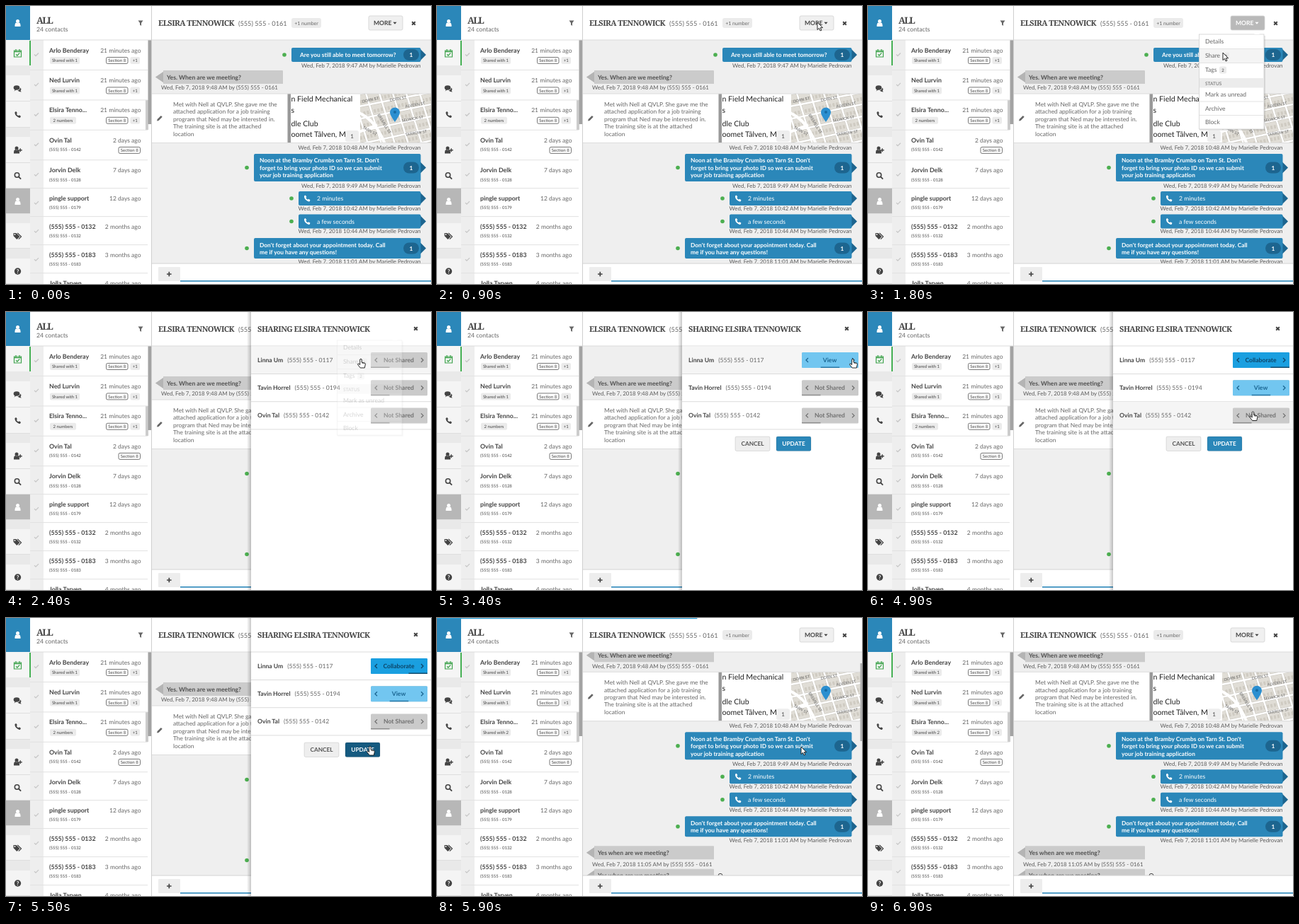
Write an HTML page that moves like this. It is 600x393 px and loops after 7 s.

```html
<!DOCTYPE html>
<html lang="en">
<head>
<meta charset="utf-8">
<title>Sharing a contact</title>
<style>
html, body { margin: 0; width: 100%; height: 100%; overflow: hidden; background: #fff; }
svg { display: block; width: 600px; height: 393px; font-family: Lato, sans-serif; text-rendering: geometricPrecision; }
.slab { font-family: "Noto Serif", serif; font-weight: 700; }
</style>
</head>
<body>
<svg id="stage" viewBox="0 0 600 393"></svg>
<script>
const BLUE = '#2b87b9', DARK = '#1d658f', INK = '#444', SOFT = '#666', LINE = '#dcdcdc';
const NAME = 'Elsira Tennowick', PHONE = '(555) 555 - 0161', AGENT = 'Marielle Pedrovan';
const LOOP = 7000, SCROLL = 47.7;

// Markup helpers
const BOLD = 'font-weight="700"', END = 'text-anchor="end"', MID = 'text-anchor="middle"', BOLD_MID = `${BOLD} ${MID}`;
const rect = (x, y, w, h, fill, more = '') => `<rect x="${x}" y="${y}" width="${w}" height="${h}" fill="${fill}" ${more}/>`;
const text = (x, y, s, size = 8.5, fill = INK, more = '') => `<text x="${x}" y="${y}" font-size="${size}" fill="${fill}" ${more}>${s}</text>`;
const path = (d, stroke, w = 1, more = '') => `<path d="${d}" fill="none" stroke="${stroke}" stroke-width="${w}" ${more}/>`;
const shape = (d, fill) => `<path d="${d}" fill="${fill}"/>`;
const at = (x, y, body) => `<g transform="translate(${x} ${y})">${body}</g>`;
const group = (id, body) => `<g id="${id}">${body}</g>`;
const hline = (x, y, w, fill = LINE) => rect(x, y, w, 1, fill);
const slab = (x, y, s, size = 11, gap = -.55) => text(x, y, s, size, INK, `class="slab" letter-spacing="${gap}"`);

// Icons, centred on 0,0
const person = c => `<circle cy="-2.6" r="2.5" fill="${c}"/>` + shape('M-4 5V3Q-4 0-1.8-.4Q0 1 1.8-.4Q4 0 4 3V5Z', c);
const phone = c => shape('M-4-3.5L-2.2-4.6L-.6-2L-1.7-.9Q-.8 1 1 1.8L2.1.7L4.5 2.3L3.5 4.2Q1.5 5-1.2 2.6Q-4.4-.2-4-3.5Z', c);
const cross = path('M-2.3-2.3L2.3 2.3M2.3-2.3L-2.3 2.3', INK, 2);
const pencil = shape('M-4 4L-3.3 1.5L1.8-3.6L3.7-1.7L-1.4 3.4Z', SOFT);
const check = path('M-3 0L-1 2L3-2', '#c6c6c6', 1.3);
const funnel = shape('M-3.5-3.5H3.5L1 0V4L-1 2.5V0Z', SOFT);
const caret = shape('M-2.6-1.2H2.6L0 1.8Z', 'currentColor');
const calendar = path('M-5-4H5V5H-5ZM-5-2.4H5M-2.5-6V-3M2.5-6V-3', '#3fa34d', 1.2) + path('M-2.4 1.2L-.6 3L2.8-.6', '#3fa34d', 1.3);
const chat = `<ellipse cx="-1.5" cy="-1" rx="4.3" ry="3.2" fill="${INK}"/>` + shape('M-5 4L-3.5 1H-1ZM3.5-1Q6 1 4 3.2L5.2 5Q2 4.8 0 3Q3 2.6 3.5-1Z', INK);
const addUser = at(-1.5, 0, person(INK)) + path('M3.7-2.2V2.8M1.2.3H6.2', INK, 1.4);
const search = `<circle cx="-1" cy="-1" r="3.2" fill="none" stroke="${INK}" stroke-width="1.6"/>` + path('M1.4 1.4L4.6 4.6', INK, 1.9);
const tags = shape('M-6-4H-2L3 1L-1.2 5L-6 0Z', INK) + path('M-.3-4L5 1L1.3 4.7', INK, 1.2) + '<circle cx="-4" cy="-2" r=".9" fill="#fff"/>';
const help = `<circle r="4.7" fill="${INK}"/>` + text(0, 2.8, '?', 8, '#fff', BOLD_MID);

function sidebar() {
  const items = [[98, 37, chat], [135, 37, phone(INK)], [185, 37, addUser], [222, 36, search],
    [258, 36, person('#fff'), '#b7b7b7'], [307, 36, tags], [357, 36, help]];
  return rect(0, 0, 34, 393, '#e9e9e9') + rect(0, 0, 34, 48, BLUE) + at(16.5, 24, person('#fff')) +
    rect(0, 48, 34, 36, '#f5f5f5') + rect(33, 49, 2, 35, '#45b054') + at(16.5, 67, calendar) +
    items.map(([y, h, icon, fill = '#f4f4f4']) =>
      rect(0, y, 34, h, fill) + hline(0, y + h - 1, 34, '#dedede') + at(16.5, y + h / 2, icon)).join('');
}

const pill = (x, y, w, s) => rect(x, y - 5, w, 10, '#ebebeb', 'rx="2"') +
  text(x + w / 2, y + 2.2, s, 6, INK, MID);
const section = (x, y) => rect(x, y - 4.5, 30.5, 9, '#fff', 'rx="2" stroke="#555" stroke-width=".8"') +
  text(x + 15.2, y + 2.2, 'Section 8', 6.1, INK, MID);

function contacts() {
  const rows = [
    ['Arlo Benderay', '21 minutes ago', 'Shared with 1'],
    ['Ned Lurvin', '21 minutes ago', 'Shared with 1'],
    ['Elsira Tenno...', '21 minutes ago', ''],
    ['Ovin Tal', '2 days ago', '(555) 555 - 0142'],
    ['Jorvin Delk', '7 days ago', '(555) 555 - 0128'],
    ['pingle support', '12 days ago', '(555) 555 - 0179'],
    ['(555) 555 - 0132', '2 months ago', '(555) 555 - 0132'],
    ['(555) 555 - 0183', '3 months ago', '(555) 555 - 0183'],
    ['Jolla Tarven', '4 months ago', '']];
  let out = rect(34, 0, 172, 393, '#fff') + rect(34, 48, 19, 345, '#eee') + rect(197, 133, 4, 42, '#ccc');
  rows.forEach(([name, when, sub], i) => {
    const y = i < 5 ? 48 + i * 42.4 : 217.6 + (i - 4) * 40;
    const mid = y + (i < 5 ? 14.5 : 14);
    out += text(61, mid + 3, name, 8.8, INK, BOLD) + text(190.5, mid + 3, when, 8.5, SOFT, END) + at(43, y + 20.5, check);
    if (i < 3) {
      const t = y + 29;
      out += section(141.5, t) + pill(175.5, t, 13.5, '+1');
      out += i < 2 ? pill(62, t, 42, sub) :
        group('before', pill(62, t, 37, '2 numbers')) + group('after', pill(62, t, 42, 'Shared with 2'));
    } else out += text(61, mid + 15.5, sub, 6, INK);
    if (i === 3) out += section(159, y + 28.7);
    out += hline(34, y + (i < 4 ? 42 : 39.5), 166, '#e2e2e2');
  });
  return out + rect(200.5, 48, 4.5, 119, '#a3a3a3') +
    rect(34, 0, 172, 48, '#fff') + slab(43, 25, 'ALL', 13, -1.5) + text(43, 36, '24 contacts', 8.7, SOFT) +
    at(190, 24, funnel) + hline(34, 47.5, 172) + rect(205, 0, 1, 393, '#cfcfcf');
}

const stamp = (y, time, x) => x ? text(x, y, `Wed, Feb 7, 2018 ${time} AM by ${PHONE}`, 7.9, '#5a5a5a')
  : text(585.5, y, `Wed, Feb 7, 2018 ${time} AM by ${AGENT}`, 7.9, '#5a5a5a', END);

function sent(x, y, h, lines, call) {
  const m = y + h / 2;
  let out = shape(`M585 ${m - 8}L593 ${m}L585 ${m + 8}Z`, DARK) + rect(x, y, 585.5 - x, h, BLUE, 'rx="2"') +
    `<circle cx="${x - 10}" cy="${m}" r="2.8" fill="#4caf50"/>`;
  if (call) return out + at(425, m, phone('#fff')) + text(439, m + 3, lines[0], 8.6, '#fff');
  const tx = x > 400 ? 415 : 358;
  lines.forEach((s, i) => out += text(tx, m + 3.3 + (i - (lines.length - 1) / 2) * 10.5, s, 8.35, '#fff', BOLD));
  return out + rect(561, m - 8, 22, 16, DARK, 'rx="8"') + text(572, m + 3, '1', 8.3, '#fff', BOLD_MID);
}

const received = (y, s) => shape(`M222 ${y}H390Q391 ${y} 391 ${y + 1}V${y + 19}H222V${y + 17}L211 ${y + 9.5}L222 ${y + 2}Z`, '#cbcbcb') +
  shape(`M222 ${y + 2}L211 ${y + 9.5}L222 ${y + 17}Z`, '#b4b4b4') + text(227, y + 12.6, s, 8.6, '#505050', BOLD);

function map() {
  const label = (x, y, turn, s) => `<text transform="translate(${x} ${y}) rotate(${turn})" font-size="5.5" fill="#666">${s}</text>`;
  let roads = '', lots = '';
  for (let i = 0; i < 7; i++) {
    roads += `M${-20 + i * 4} ${-14 + i * 17}L110 ${-38 + i * 17}M${-12 + i * 19} -4L${12 + i * 19} 74`;
    lots += `M-10 ${-3 + i * 17}L110 ${-29 + i * 17}`;
  }
  return `<svg x="500" y="124" width="100" height="69">` + rect(0, 0, 100, 69, '#e0ddd6') +
    path(lots, '#cfcbc2', 5, 'stroke-dasharray="3 2"') + path(roads, '#c4c1b9', 3.6) + path(roads, '#fff', 2.6) +
    path('M-4 26Q22 36 36 74M-4 55L24 44', '#fff', 4) +
    label(3, 13, -12, 'DORN ST') + label(42, 11, -10, 'DORN ST') + label(64, 20, -10, 'ALVERN ST') +
    label(59, 40, -10, 'SELWICK ST') + label(24, 30, 58, 'BREMELL ST') + label(3, 49, 28, 'TARN ST') + label(64, 60, -10, 'TARROW ST') +
    shape('M49 40Q42 30 42 26.5A7 7 0 0 1 56 26.5Q56 30 49 40Z', '#2b8fd0') + '<circle cx="49" cy="26" r="2" fill="#176ca5"/></svg>';
}

function note() {
  const lines = ['Met with Nell at QVLP. She gave me the', 'attached application for a job training',
    'program that Ned may be interested in.', 'The training site is at the attached', 'location'];
  const scan = [['n Field Mechanical', 135], ['s', 151], ['dle Club', 170], ['oomet Tâlven, M', 185]];
  return rect(206, 124, 394, 69, '#fff') + at(217, 158.5, pencil) +
    lines.map((s, i) => text(236, 142 + i * 10.4, s, 8.4, SOFT)).join('') +
    scan.map(([s, y]) => text(402.5, y, s, 10.6, '#222')).join('') +
    rect(397.5, 124, 4.5, 69, '#999') + rect(479, 176, 19, 16, '#eee', 'rx="3"') + text(488.5, 187, '1', 8, INK, MID) +
    map() + hline(206, 123.5, 394) + hline(206, 193, 394);
}

function thread() {
  return sent(403, 59, 20, ['Are you still able to meet tomorrow?']) + stamp(86.5, '9:47') +
    received(91, 'Yes. When are we meeting?') + stamp(118.3, '9:48', 219) + note() + stamp(203, '10:48') +
    sent(350, 209, 39, ['Noon at the Bramby Crumbs on Tarn St. Don\'t', 'forget to bring your photo ID so we can submit', 'your job training application']) +
    stamp(257, '9:49') + sent(413, 262, 20, ['2 minutes'], true) + stamp(289, '10:42') +
    sent(413, 294.5, 20, ['a few seconds'], true) + stamp(321.3, '10:44') +
    sent(350, 328, 29, ['Don\'t forget about your appointment today. Call', 'me if you have any questions!']) + stamp(364.3, '11:01') +
    received(370, 'Yes when are we meeting?') + stamp(398.5, '11:05', 219) + received(402.5, 'Yes when are we meeting?') +
    '<circle cx="400" cy="412" r="3" fill="none" stroke="#444"/>';
}

function conversation() {
  return rect(206, 48, 394, 345, '#efefef') + group('thread', thread()) + rect(597.5, 64, 2.5, 110, '#b0b0b0', 'id="thumb"') +
    rect(206, 0, 394, 48, '#fff') + hline(206, 47.5, 394) + slab(215, 28, NAME.toUpperCase()) +
    text(328, 27.5, PHONE, 9.2, SOFT) + rect(403, 17, 42, 14, '#ebebeb', 'rx="3"') + text(424, 26.6, '+1 number', 7, SOFT, MID) +
    rect(512, 14, 48, 20, '#f0f0f0', 'id="more" rx="2" stroke="#d2d2d2" stroke-width=".8"') +
    group('moreText', text(519, 27.2, 'MORE', 8.6, 'currentColor', BOLD) + at(549, 24, caret)) + at(575.5, 24.5, cross) +
    rect(206, 364, 394, 29, '#fff') + hline(206, 363.5, 394, '#d4d4d4') +
    rect(215, 369, 31, 20, '#ededed', 'rx="1"') + path('M227 379H233.6M230.3 375.7V382.3', INK, 1.7) + rect(246, 388, 354, 1.6, BLUE);
}

// Label, fill, ink, slider
const states = [['Not Shared', '#cacaca', '#707070', '#8e8e8e'], ['View', '#72c6f0', '#1b6692', '#2879a7'], ['Collaborate', '#1a9fe0', '#0d4567', '#124b6c']];
const rowY = i => 68 + i * 39.2;

function toggle(i) {
  const y = rowY(i);
  return states.map(([s, fill, ink], k) => group(`t${i}${k}`,
    rect(515, y - 11, 80, 22, fill, 'rx="1.5"') + text(554.5, y + 3, s, 8.6, ink, BOLD_MID) +
    path(`M524 ${y - 3}L521 ${y}L524 ${y + 3}M586 ${y - 3}L589 ${y}L586 ${y + 3}`, ink, 1.3))).join('') +
    rect(515, y + 9.5, 26.5, 1.5, '#888', `id="bar${i}"`);
}

function panel() {
  const people = [['Linna Um', '(555) 555 - 0117'], ['Tavin Horrel', '(555) 555 - 0194'], ['Ovin Tal', '(555) 555 - 0142']];
  const button = (x, s, fill, ink, id) => rect(x, 176, 49, 20.5, fill, `id="${id}" rx="2" stroke="#000" stroke-opacity=".15" stroke-width=".7"`) +
    text(x + 24.5, 189.3, s, 8.3, ink, BOLD_MID);
  return rect(340, 0, 6, 393, 'url(#shade)') + rect(346, 0, 254, 393, '#fff') +
    slab(355, 28, 'SHARING ' + NAME.toUpperCase()) + at(578.5, 23.5, cross) + hline(346, 47.5, 254) +
    people.map(([name, number], i) => {
      const y = rowY(i);
      return rect(346, y - 19.5, 254, 38.5, '#f5f5f5', `id="row${i}"`) +
        `<text x="355" y="${y + 3}" font-size="8.6" fill="${SOFT}"><tspan font-weight="700" fill="${INK}">${name}</tspan><tspan dx="6">${number}</tspan></text>` +
        toggle(i) + hline(346, y + 19, 254);
    }).join('') +
    rect(515, 96, 80, 22, 'none', 'id="focus" stroke="#7db9dc"') + path('M586 104L589 107L586 110', '#176a9b', 1.8, 'id="next"') +
    group('buttons', button(421, 'CANCEL', '#eee', '#555', 'cancel') + button(479, 'UPDATE', BLUE, '#fff', 'update'));
}

function menu() {
  const items = [['Details', 50], ['Share', 70, 0, 500], ['Tags', 90, 2, 496], ['Mark as unread', 125], ['Archive', 144.5], ['Block', 164]];
  return rect(468, 42, 93, 134, '#000', 'opacity=".1"') + rect(467.5, 40, 91.5, 134, '#fff', 'stroke="#d0d0d0" stroke-width=".8"') +
    shape('M545 40L549 36L553 40Z', '#fff') + rect(468, 60.5, 90.5, 19.5, '#f4f4f4', 'id="share"') +
    rect(468, 102, 90.5, 13.5, '#ececec') + text(476, 111.5, 'STATUS', 6.6, SOFT) +
    [60, 80, 134.5, 154].map(y => hline(468, y, 90.5, '#e4e4e4')).join('') +
    items.map(([s, y, n, x]) => text(476, y + 3, s, 8.6, SOFT) + (x ? pill(x, y + .5, 10, n) : '')).join('');
}

const arrow = '<path d="M0 0V10.5L2.5 8.3L4.1 12L5.9 11.2L4.3 7.7H7.5Z" fill="#fff" stroke="#111" stroke-width=".9"/>';
const hand = '<path d="M-1.3 0Q0-1.4 1.2 0V4.2L5.6 5.2Q6.6 5.6 6.3 7.2L5.3 12H-.8L-4.4 7.4Q-4.6 5.8-3 6.2L-1.3 7.6Z" fill="#fff" stroke="#111" stroke-width=".9"/>' +
  path('M2.3 6.2V4.6M4.2 6.5V5', '#111', .7);

stage.innerHTML = '<defs><linearGradient id="shade"><stop stop-color="#000" stop-opacity="0"/><stop offset="1" stop-color="#000" stop-opacity=".22"/></linearGradient></defs>' +
  conversation() + contacts() + sidebar() + group('panel', panel()) + group('menu', menu()) +
  rect(0, 0, 0, 1.2, '#2b9fd8', 'id="loading"') + group('cursor', group('arrow', arrow) + group('hand', hand));

const $ = id => document.getElementById(id);
const set = (id, name, value) => $(id).setAttribute(name, value);
const show = (id, v) => set(id, 'opacity', +v);
const within = (t, a, b) => t >= a && t < b;
const clamp = v => Math.min(1, Math.max(0, v));
const ease = (t, a, b) => {
  const u = clamp((t - a) / (b - a));
  return u * u * (3 - 2 * u);
};

// Pointer stops: time, x, y
const stops = [[400, 510, 130], [900, 537, 23], [1200, 537, 23], [1700, 501, 66], [2500, 501, 67], [3000, 587, 67],
  [3700, 587, 67], [4000, 573, 101], [4600, 573, 101], [5200, 514, 182], [6300, 514, 182]];
function pointer(t) {
  const i = Math.max(1, stops.findIndex(s => s[0] > t));
  const [a, x, y] = stops[i - 1], [b, x2, y2] = stops[i], k = ease(t, a, b);
  return [x + (x2 - x) * k, y + (y2 - y) * k];
}

function draw(t) {
  const saved = t >= 5700, [px, py] = pointer(t);
  set('thread', 'transform', `translate(0 ${saved ? -SCROLL : 0})`);
  show('before', !saved);
  show('after', saved);
  show('thumb', within(t, 5700, 6400));
  set('loading', 'width', 600 * clamp((t - 5600) / 490));
  show('loading', 1 - ease(t, 6100, 6400));

  const active = within(t, 1000, 2500);
  set('more', 'fill', active ? '#b9b9b9' : '#f0f0f0');
  set('moreText', 'color', active ? '#fff' : INK);
  show('menu', ease(t, 1000, 1200) * (1 - ease(t, 2200, 2500)));
  show('share', within(t, 1600, 2300));

  const open = ease(t, 2100, 2400) * (1 - ease(t, 5600, 5900));
  set('panel', 'transform', `translate(${262 * (1 - open)} 0)`);

  const bars = [ease(t, 3000, 3200) + ease(t, 3400, 3600), ease(t, 4100, 4300), 0];
  const levels = [ease(t, 3100, 3300) + ease(t, 3500, 3700), ease(t, 4300, 4500), 0];
  bars.forEach((v, i) => {
    set('bar' + i, 'x', 515 + v * 26.7);
    set('bar' + i, 'fill', states[Math.round(v)][3]);
    for (let k = 1; k < 3; k++) show(`t${i}${k}`, clamp(levels[i] - k + 1));
    show('row' + i, Math.abs(py + 4 - rowY(i)) < 19);
  });
  show('focus', within(t, 4100, 4500));
  show('next', within(t, 3900, 4500));
  show('buttons', ease(t, 3000, 3300));
  set('update', 'fill', t >= 5200 ? '#155a80' : BLUE);

  const pointing = within(t, 1900, 5700);
  show('cursor', within(t, 400, 6300));
  set('cursor', 'transform', `translate(${px} ${py})`);
  show('arrow', !pointing);
  show('hand', pointing);
}

const start = performance.now();
function tick() {
  draw(Math.floor(((performance.now() - start) % LOOP) / 100) * 100);
  requestAnimationFrame(tick);
}
draw(0);
requestAnimationFrame(tick);
</script>
</body>
</html>
```
